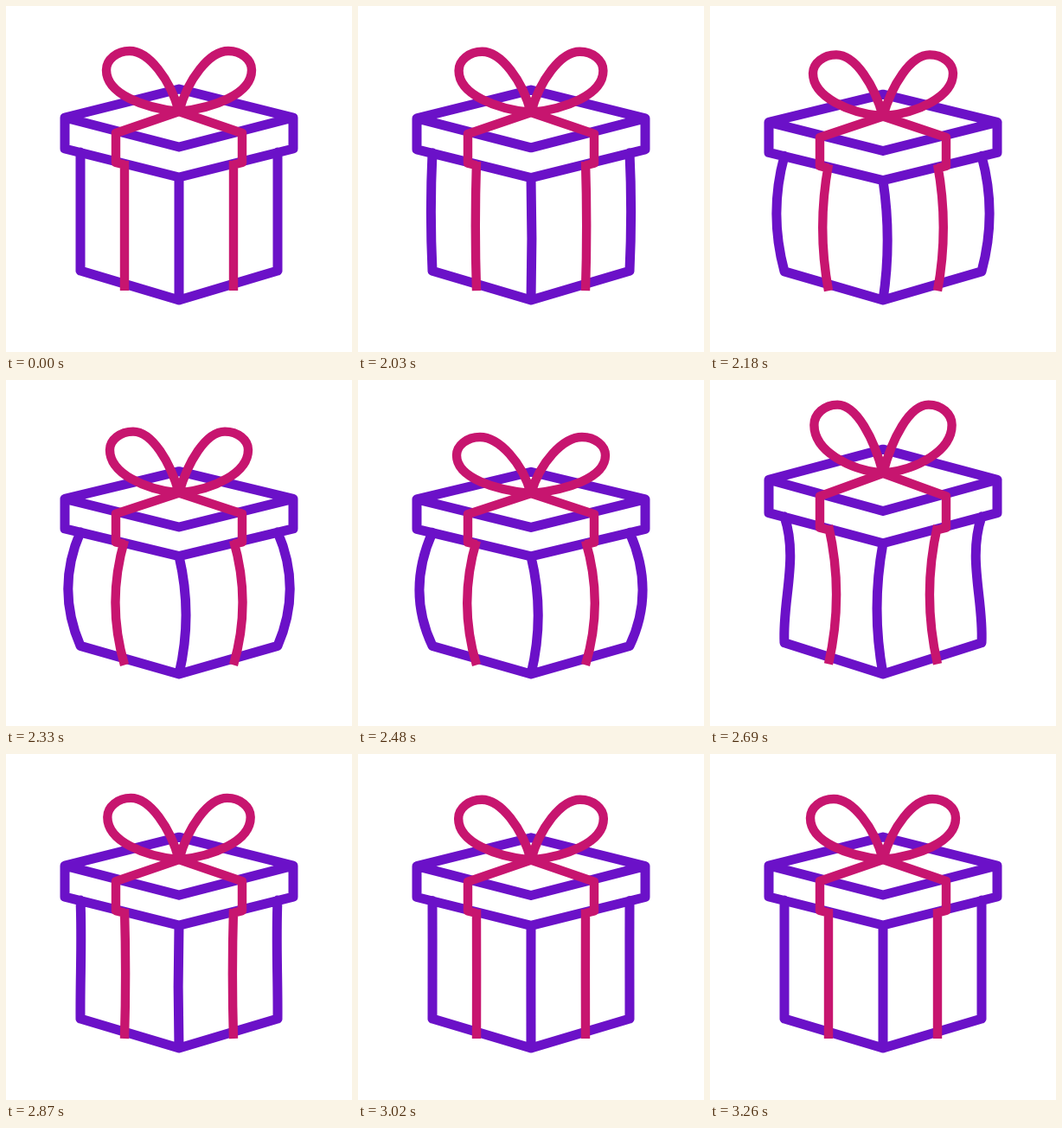
Recreate the animation shown at these times as an HTML page. Size 400x400 px, loop 3350 ms.

```html
<!DOCTYPE html>
<html lang="en">
<head>
<meta charset="utf-8">
<title>Gift box</title>
<style>
  html, body { margin: 0; width: 100%; height: 100%; overflow: hidden; background: #fff; }
  svg { display: block; width: 100%; height: 100%; }
  path { fill: none; stroke-linejoin: round; }
</style>
</head>
<body>
<svg viewBox="0 0 400 400">
  <path id="box" stroke="#6b11c8" stroke-width="11" stroke-linecap="round"/>
  <path id="ribbon" stroke="#c7156f" stroke-width="10.4"/>
</svg>
<script>
const LOOP = 3350, STEP = 30, FLOOR = 340;
const box = document.getElementById('box');
const ribbon = document.getElementById('ribbon');

// Each track is a list of [time, value]; the first move eases out, the rest ease both ways.
const tracks = {
  stretch: [[2000, 1], [2460, .956], [2690, 1.065], [2930, .988], [3110, 1.006], [3260, 1]],
  upper: [[2000, 0], [2450, 1.1], [2695, -.87], [2930, .03], [3110, -.05], [3260, 0]],
  lower: [[2000, 0], [2460, 1.1], [2760, 0], [2930, .03], [3110, -.03], [3260, 0]],
  bow: [[2000, 0], [2330, 4], [2560, -4.2], [2700, 4.5], [2930, .7], [3110, -.4], [3260, 0]]
};

function sample(keys, t) {
  if (t <= keys[0][0]) return keys[0][1];
  const i = keys.findIndex(key => key[0] > t);
  if (i < 0) return keys[keys.length - 1][1];
  const [t0, a] = keys[i - 1], [t1, b] = keys[i];
  const p = (t - t0) / (t1 - t0);
  const eased = i === 1 ? Math.sin(p * Math.PI / 2) : (1 - Math.cos(p * Math.PI)) / 2;
  return a + (b - a) * eased;
}

function draw(time) {
  const t = Math.floor((time % LOOP - 20) / STEP) * STEP + 20;
  const stretch = sample(tracks.stretch, t);
  const upper = sample(tracks.upper, t);
  const lower = sample(tracks.lower, t);
  const w = sample(tracks.bow, t);

  const at = (x, y) => `${x.toFixed(2)},${(FLOOR + (y - FLOOR) * stretch).toFixed(2)} `;
  const line = (...points) => 'M' + points.map(p => at(...p)).join('L');
  const bend = (x, top, bottom, up, down) =>
    'M' + at(x, top) + 'C' + at(x + up, top + (bottom - top) / 3) +
    at(x + down, bottom - (bottom - top) / 3) + at(x, bottom);

  let boxPath = line([68, 129], [200, 96], [332, 129], [200, 163]) + 'Z' +
    line([68, 129], [68, 165], [200, 198], [332, 165], [332, 129]) +
    line([86, 306], [200, FLOOR], [314, 306]) +
    bend(200, 198, FLOOR, 10.7 * upper, 10.7 * upper);
  let ribbonPath = '';

  for (const side of [-1, 1]) {
    const x = d => 200 + side * d;
    boxPath += bend(x(114), 169, 306, side * 19 * upper, side * 19 * lower);
    ribbonPath += line([200, 122], [x(73), 147], [x(73), 181], [x(63), 183.5]) +
      bend(x(63), 179, 329, side * 14 * upper, side * 14 * upper) +
      'M' + at(200, 122) +
      'C' + at(x(10), 85) + at(x(35 - w), 52 - w) + at(x(57 - w), 52 - w) +
      'C' + at(x(72 - w), 52 - w) + at(x(84 - w), 62 - w) + at(x(84 - w), 74 - w) +
      'C' + at(x(84 - w), 102 - w) + at(x(40), 118) + at(200, 122);
  }
  box.setAttribute('d', boxPath);
  ribbon.setAttribute('d', ribbonPath);
}

const start = performance.now();
function tick() {
  draw(performance.now() - start);
  requestAnimationFrame(tick);
}
tick();
</script>
</body>
</html>
```
